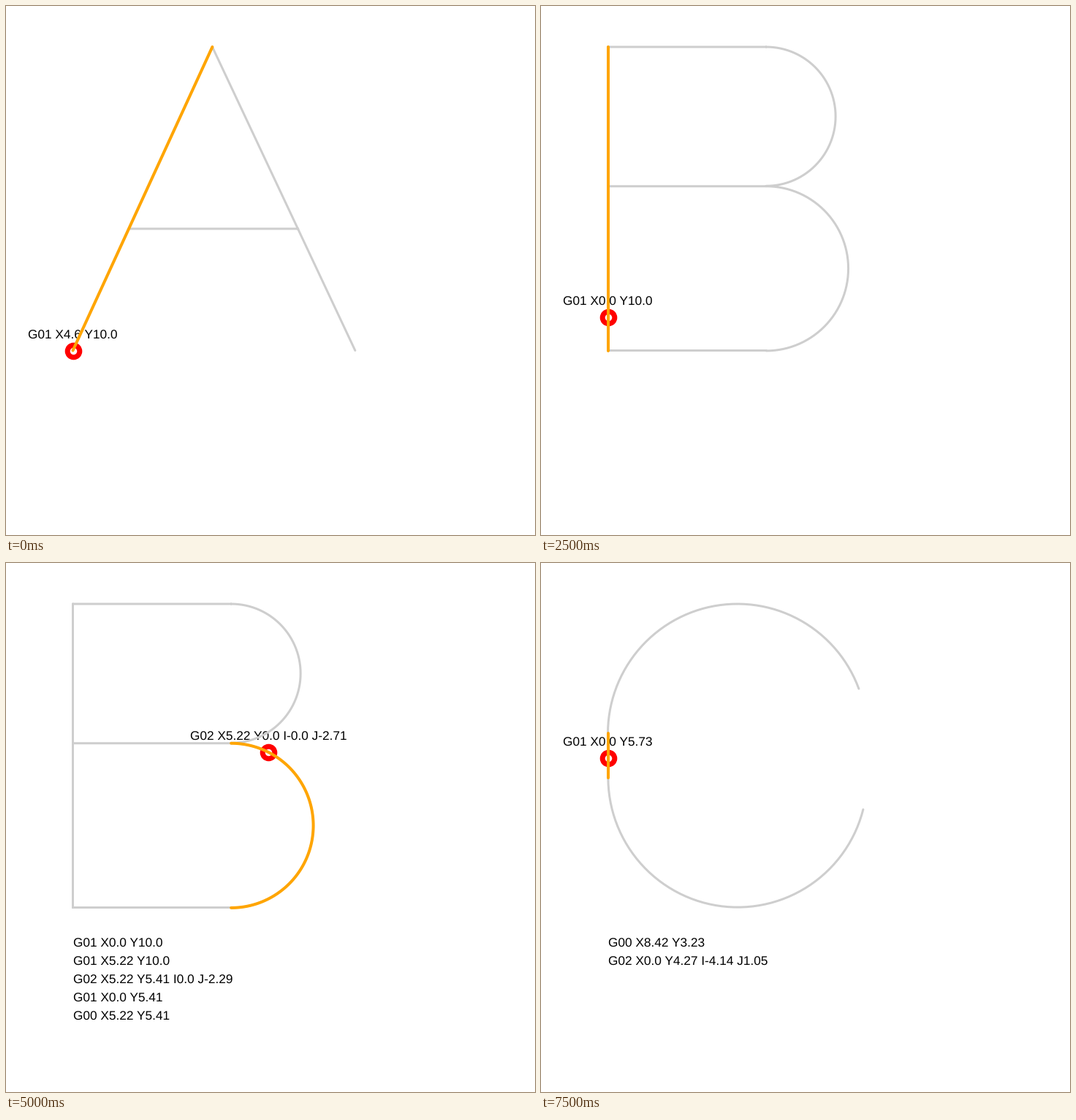
Write a matplotlib script that moves like this. It is 724x724 px and loops after 8 s.

```python
import numpy as np
import matplotlib.pyplot as plt
from matplotlib.animation import FuncAnimation

plt.rcParams["font.family"] = "Liberation Sans"
plt.rcParams["text.hinting"] = "none"

SIZE, DPI = 724, 100
PX = 72 / DPI                      # points per pixel
ORIGIN = np.array([91.5, 471.5])
SCALE = np.array([41.5, -41.55])
FONT = 17.25 * PX

PROGRAMS = [
    """G01 X4.6 Y10.0
    G01 X9.31 Y0.0
    G00 X1.84 Y4.01
    G01 X7.43 Y4.01
    G00 X9.31 Y0.0""",
    """G01 X0.0 Y10.0
    G01 X5.22 Y10.0
    G02 X5.22 Y5.41 I0.0 J-2.29
    G01 X0.0 Y5.41
    G00 X5.22 Y5.41
    G02 X5.22 Y0.0 I-0.0 J-2.71
    G01 X0.0 Y0.0
    G00 X7.93 Y0.0""",
    """G00 X8.42 Y3.23
    G02 X0.0 Y4.27 I-4.14 J1.05
    G01 X0.0 Y5.73
    G02 X8.29 Y7.21 I4.27 J0.0""",
]

# How far the tool has come along its move at each tick, one move per tick
PROGRESS = [0, .12, .005, .1, .12,
            .11, .2, .333, .45, .45, .15, .15, .098,
            .187, .02, .446]


def trace(start, words):
    """Points of one move, in pixels."""
    end = np.array([words["X"], words["Y"]])
    if words["G"] < 2:
        s = np.linspace(0, 1, 2)[:, None]
        pts = start + (end - start) * s
    else:
        center = start + [words["I"], words["J"]]
        r = np.hypot(*(start - center))
        a0 = np.arctan2(*(start - center)[::-1])
        a1 = np.arctan2(*(end - center)[::-1])
        a = a0 - np.linspace(0, (a0 - a1) % (2 * np.pi), 121)
        pts = center + r * np.column_stack([np.cos(a), np.sin(a)])
    return ORIGIN + SCALE * pts, end


def parse(program):
    pos, moves = np.zeros(2), []
    for line in map(str.strip, program.splitlines()):
        words = {w[0]: float(w[1:]) for w in line.split()}
        pts, pos = trace(pos, words)
        moves.append((line, words["G"] == 0, pts))
    return moves


def outline(moves):
    gap = np.full((1, 2), np.nan)
    return np.vstack([p for _, rapid, pts in moves if not rapid
                      for p in (pts, gap)])


def point_at(pts, f):
    s = np.linspace(0, 1, len(pts))
    return [np.interp(f, s, pts[:, k]) for k in (0, 1)]


LETTERS = [parse(p) for p in PROGRAMS]
OUTLINES = [outline(m) for m in LETTERS]
TICKS = [(k, n) for k, moves in enumerate(LETTERS)
         for n in range(len(moves))][:len(PROGRESS)]

fig = plt.figure(figsize=(SIZE / DPI, SIZE / DPI), dpi=DPI, facecolor="white")
ax = fig.add_axes([0, 0, 1, 1])
ax.set(xlim=(0, SIZE), ylim=(SIZE, 0))
ax.axis("off")

shape, = ax.plot([], [], color="#cecece", lw=3 * PX,
                 solid_capstyle="round", zorder=2)
tool, = ax.plot([], [], "o", mfc="white", mec="red", zorder=3)
cut, = ax.plot([], [], color="orange", lw=4 * PX,
               solid_capstyle="round", zorder=4)
jump, = ax.plot([], [], color="#200000", lw=3.6 * PX,
                dash_capstyle="round", zorder=4)
jump.set_linestyle((0, (8 / 3.6, 8.6 / 3.6)))
label = ax.text(0, 0, "", size=FONT, ha="center", va="baseline", zorder=1)
listing = [ax.text(ORIGIN[0], 526 + 25 * i, "", size=FONT,
                   va="baseline", zorder=1) for i in range(7)]


def update(i):
    k, n = TICKS[i]
    moves, f = LETTERS[k], PROGRESS[i]
    line, rapid, pts = moves[n]
    x, y = point_at(pts, f)

    shape.set_data(*OUTLINES[k].T)
    active, idle = (jump, cut) if rapid else (cut, jump)
    active.set_data(*pts.T)
    idle.set_data([], [])

    # the ring is thinner on rapid moves
    width = max(4.8, 6.5 - 9 * f) if rapid else 7
    tool.set_data([x], [y])
    tool.set_markersize(16.6 * PX)
    tool.set_markeredgewidth(width * PX)

    label.set_position((x, y - 16))
    label.set_text(line)
    for j, row in enumerate(listing):
        row.set_text(moves[j][0] if j < n else "")
    return [shape, tool, cut, jump, label, *listing]


anim = FuncAnimation(fig, update, frames=len(PROGRESS), interval=500,
                     repeat=True, repeat_delay=0, blit=False)
plt.show()
```
